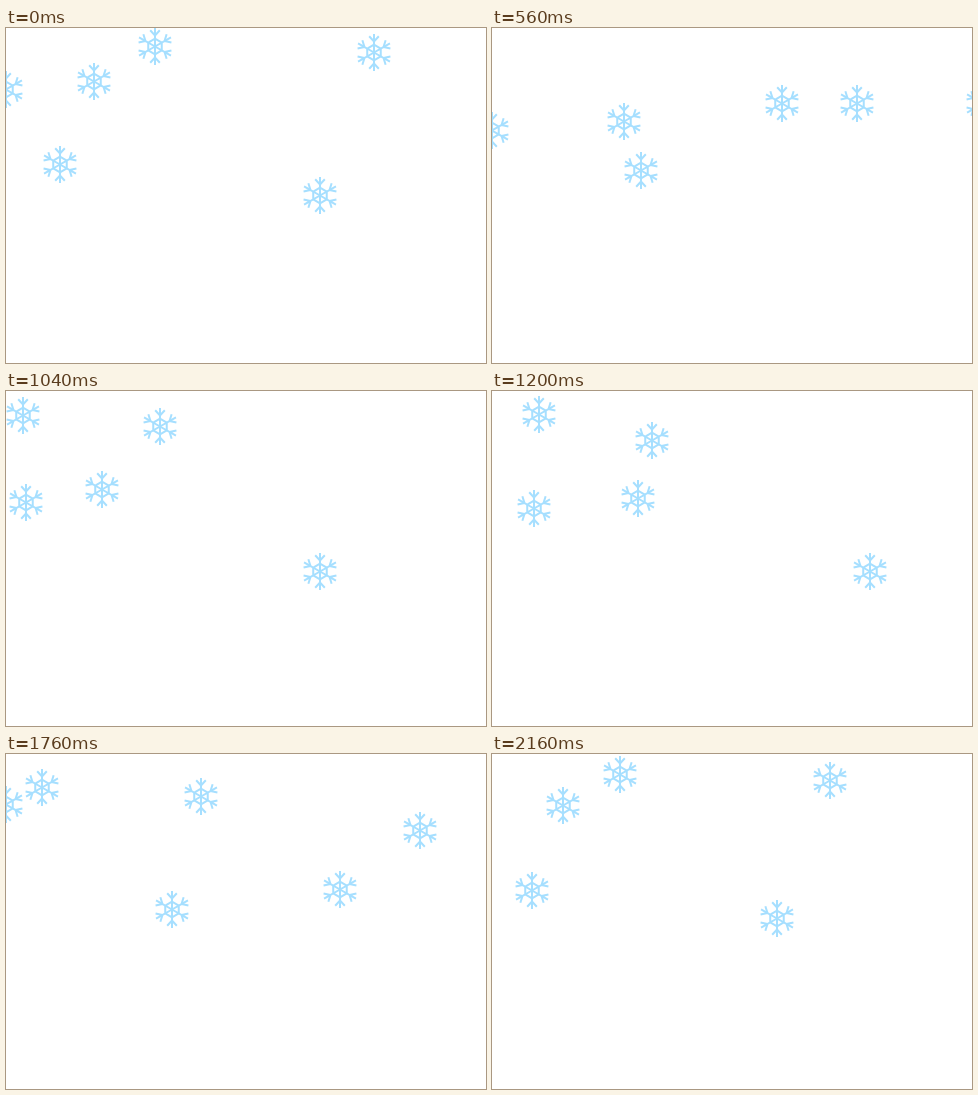
Recreate the animation shown at these times as an HTML page with a canvas. Size 480 by 335 pixels, loop 2.24 s.

```html
<!DOCTYPE html>
<html lang="en">
<head>
<meta charset="utf-8">
<title>Drifting snow</title>
<style>
  html, body { margin: 0; width: 100%; height: 100%; overflow: hidden; background: #fff; }
  canvas { display: block; }
</style>
</head>
<body>
<canvas id="sky" width="480" height="335"></canvas>
<script>
const ctx = document.getElementById('sky').getContext('2d');
const STEP = 80, STEPS = 28;

// All flakes pass their key points on the same beats, repeated every lap
const BEATS = [0, 3, 7, 13, 18, 22];
const beatTime = n => BEATS[n % BEATS.length] + STEPS * Math.floor(n / BEATS.length);

const flake = (firstBeat, ...points) =>
  points.map(([x, y], i) => ({ t: beatTime(firstBeat + i), x, y }));

const flakes = [
  flake(5, [36, 33], [149, 18], [233, 18], [365, 75]),
  flake(5, [0, 50], [88, 53], [158, 73], [290, 75]),
  flake(3, [17, 24], [97, 24], [195, 42], [368, 24], [463, 29], [491, 75]),
  flake(3, [20, 111], [80, 127], [166, 155], [314, 167], [437, 186]),
  flake(2, [0, 102], [96, 98], [242, 118], [414, 76]),
  flake(0, [54, 136], [97, 130], [149, 142], [314, 180]),
  flake(0, [0, 61], [54, 73], [132, 93], [154, 35], [189, 90], [334, 135])
];

function tangent(path, i, axis) {
  const a = path[Math.max(i - 1, 0)], b = path[Math.min(i + 1, path.length - 1)];
  return (b[axis] - a[axis]) / (b.t - a.t);
}

// Smooth curve through the key points; beyond them the wind blows level
function position(path, t) {
  const last = path.length - 1, first = path[0], end = path[last];
  if (t <= first.t) return { x: first.x + tangent(path, 0, 'x') * (t - first.t), y: first.y };
  if (t >= end.t) {
    const d = t - end.t;
    return { x: end.x + tangent(path, last, 'x') * d * (1 + 0.08 * d), y: end.y };
  }
  const i = path.findIndex(p => p.t > t) - 1;
  const a = path[i], b = path[i + 1], span = b.t - a.t;
  const u = (t - a.t) / span, v = 1 - u;
  const blend = axis =>
    v * v * (1 + 2 * u) * a[axis] + u * u * (3 - 2 * u) * b[axis]
    + span * u * v * (v * tangent(path, i, axis) - u * tangent(path, i + 1, axis));
  return { x: blend('x'), y: blend('y') };
}

// One arm: spoke, fork and a side of the inner hexagon
const arm = new Path2D('M0 0V-18.4M-4.8-16.2L0-11L4.8-16.2M0-7.8L6.75-3.9');

function drawFlake(x, y) {
  ctx.save();
  ctx.translate(x, y + 0.5);
  for (let i = 0; i < 6; i++) {
    ctx.stroke(arm);
    ctx.rotate(Math.PI / 3);
  }
  ctx.restore();
}

function render(now) {
  const step = Math.floor(now / STEP) % STEPS;
  ctx.clearRect(0, 0, 480, 335);
  ctx.strokeStyle = '#a6dfff';
  ctx.lineWidth = 2;
  for (const path of flakes) {
    for (const lap of [-1, 0, 1]) {
      const p = position(path, step + lap * STEPS);
      if (p.x >= 0 && p.x < 500) drawFlake(Math.round(p.x), Math.round(p.y));
    }
  }
}

const start = performance.now();
function tick() {
  render(performance.now() - start);
  requestAnimationFrame(tick);
}
tick();
</script>
</body>
</html>
```
